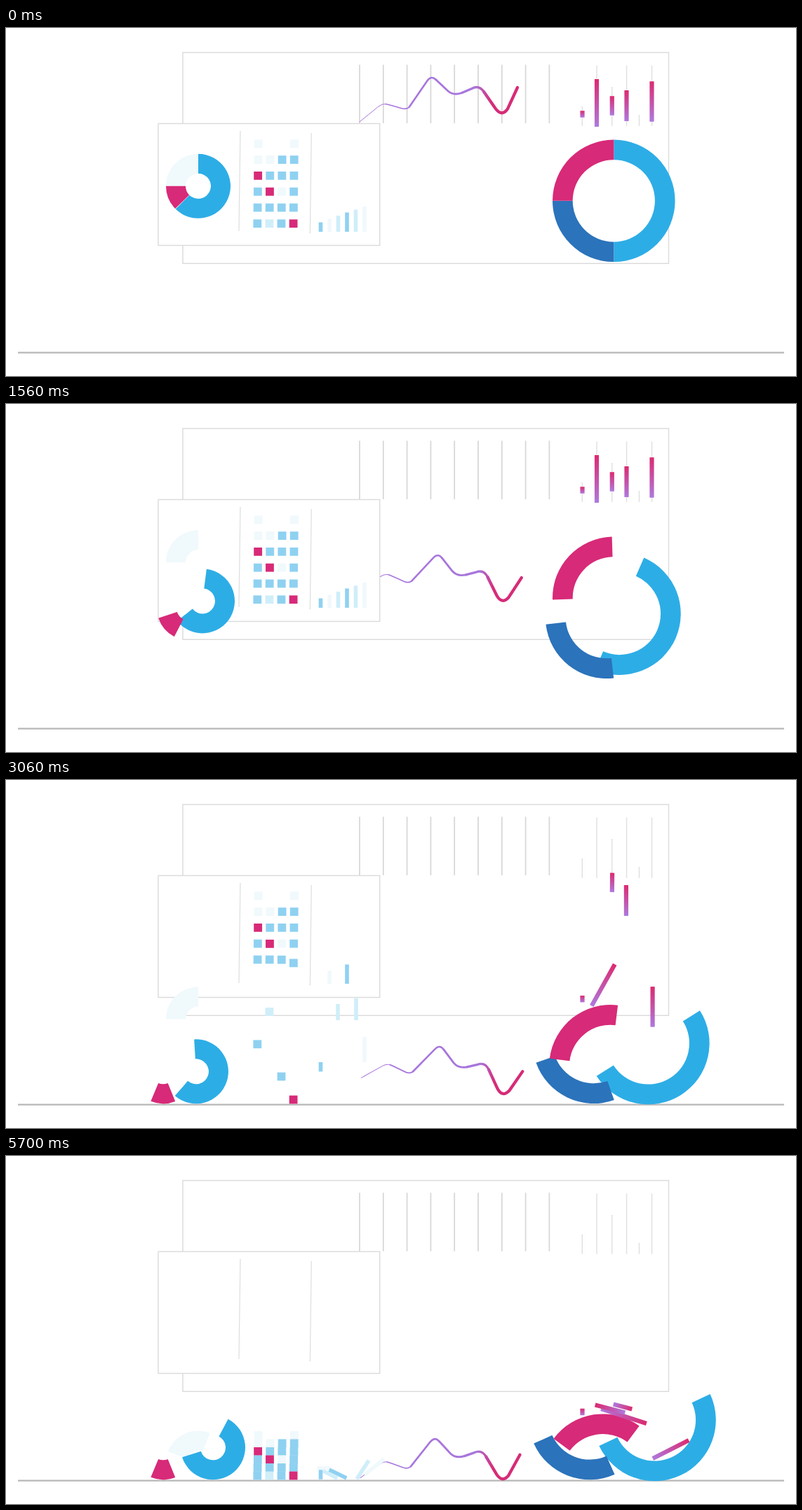
These frames come from a looping animation (1126 px wide and 497 px high, 5850 ms). An HTML page:

```html
<!DOCTYPE html>
<html lang="en">
<head>
<meta charset="utf-8">
<title>Falling charts</title>
<style>
  html, body { margin: 0; width: 100%; height: 100%; overflow: hidden; background: #fff; }
  svg { display: block; width: 100%; height: 100%; }
</style>
</head>
<body>
<svg id="stage" viewBox="0 0 1126 497">
  <defs>
    <linearGradient id="candle" x1="0" y1="0" x2="0" y2="1">
      <stop offset="0" stop-color="#dc2a70"/><stop offset="1" stop-color="#ae79de"/>
    </linearGradient>
    <linearGradient id="trend" gradientUnits="userSpaceOnUse" x1="668" y1="0" x2="692" y2="0">
      <stop offset="0" stop-color="#a876dc"/><stop offset="1" stop-color="#d62c78"/>
    </linearGradient>
  </defs>
</svg>
<script>
const LOOP = 5850, LAST = 5700, STEP = 30;
const BLUE = '#2dade6', DARK = '#2b73bb', PINK = '#d72a78';
const PALE = '#f0f9fc', LIGHT = '#cfeef9', MID = '#8fd1f1';
const stage = document.getElementById('stage');
const parts = [];
const mix = (a, b, u) => a + (b - a) * u;
const radians = deg => deg * Math.PI / 180;

function add(tag, attrs, parent = stage) {
  const el = document.createElementNS('http://www.w3.org/2000/svg', tag);
  for (const name in attrs) el.setAttribute(name, attrs[name]);
  return parent.appendChild(el);
}

function line(x1, y1, x2, y2, stroke, width) {
  add('line', { x1, y1, x2, y2, stroke, 'stroke-width': width });
}

function panel(x, y, width, height) {
  add('rect', { x, y, width, height, fill: '#fff', stroke: '#dadada', 'stroke-width': 1.4 });
}

function block(width, height, fill) {
  return add('rect', { x: -width / 2, y: -height / 2, width, height, fill });
}

// Ring sector around the origin; angles run clockwise from the top
function sector(outer, inner, from, to, fill) {
  const at = (r, deg) => `${r * Math.sin(radians(deg))} ${-r * Math.cos(radians(deg))}`;
  const large = to - from > 180 ? 1 : 0;
  const d = `M${at(outer, from)}A${outer} ${outer} 0 ${large} 1 ${at(outer, to)}` +
    `L${at(inner, to)}A${inner} ${inner} 0 ${large} 0 ${at(inner, from)}Z`;
  return add('path', { d, fill });
}

// A part falls from one pose [x, y, turn] to its landing pose, then settles into its rest pose.
// speed: px per second, ramp: ms to reach it, drift and tip: exponents of the sideways motion,
// turn: how early the rotation completes, sway: degrees rolled away and back on landing
function drop(el, start, speed, from, land, rest = land, options = {}) {
  parts.push({
    el, start, speed, from, land, rest,
    settle: 300, ramp: 150, drift: 1, turn: 1, tip: 1, sway: 0, radius: 0, ...options
  });
}

function pose(p, t) {
  const [x0, y0] = p.from, [x1, y1, r1 = 0] = p.land, [x2, y2, r2 = 0] = p.rest;
  const time = Math.max(0, t - p.start), height = y1 - y0, speed = p.speed / 1000;
  const fallen = time < p.ramp ? speed * time * time / (2 * p.ramp) : speed * (time - p.ramp / 2);
  if (fallen < height) {
    const f = fallen / height;
    return [mix(x0, x1, f ** p.drift), y0 + fallen, r1 * Math.min(1, f * p.turn)];
  }
  const u = Math.min(1, (fallen - height) / speed / p.settle), v = u ** p.tip;
  const roll = p.sway * Math.sin(Math.PI * u);
  return [mix(x1, x2, v) + radians(roll) * p.radius, mix(y1, y2, u), mix(r1, r2, v) + roll];
}

// Back panel, grid and wicks
panel(252, 35, 692.5, 301.3);
for (let i = 0; i < 9; i++) line(504 + i * 33.8, 52.5, 504 + i * 33.8, 136, '#d6d6d6', 1.7);
[[821.3, 112], [842, 53.5], [863.8, 84], [884.6, 53.5], [902.5, 124], [920.6, 53.5]]
  .forEach(([x, y]) => line(x, y, x, 140, '#dedede', 1.3));
line(17, 463.6, 1109, 463.6, '#b7b7b7', 2.2);

// Trend line, with its origin at the valley
const trend = add('g', {});
const curve = add('g', {
  transform: 'translate(-706.5 -121)', fill: 'none', stroke: 'url(#trend)', 'stroke-linecap': 'round'
}, trend);
[
  ['M504 134L531 112Q536 108 541 108.5', 1],
  ['M541 108.5Q546 109.5 563 114.5Q571 117 575 112.5', 1.7],
  ['M575 112.5L600 76Q606 67 613 74', 2.6],
  ['M613 74L630 90Q638 97 650 92.5', 2.9],
  ['M650 92.5L664 86.5Q674 81 681 91', 3.3],
  ['M681 91L698 115.5Q707 127 715 115.5L729 85', 4.3]
].forEach(([d, width]) => add('path', { d, 'stroke-width': width }, curve));
drop(trend, 0, 111.5, [706.5, 121], [708, 461, 10], [707.5, 461, 4], { ramp: 260, turn: 1.8, settle: 220 });

// Front panel
panel(217, 136.5, 315.7, 174);
line(334, 147, 332, 290, '#dedede', 1.2);
line(435.3, 150, 433.4, 293.5, '#dedede', 1.2);

// Large ring
const ring = [866.3, 246.8];
const arc = (from, to, fill) => sector(87.3, 58.6, from, to, fill);
drop(arc(0, 180, BLUE), 0, 51, ring, [915.3, 376, 57.5], [924.5, 377, 65], { ramp: 1050, drift: 2 });
drop(arc(180, 270, DARK), 0, 56, ring, [844, 374.5, -14.5], [832, 375, -24], { ramp: 1050, settle: 500 });
drop(arc(270, 360, PINK), 1060, 75, ring, [866.3, 350, -6], [850.7, 455.7, 36.5], { ramp: 200, settle: 950, tip: 2 });

// Small pie
const pie = [274, 225.8];
const slice = (from, to, fill) => sector(46, 18, from, to, fill);
drop(slice(270, 360, PALE), 1520, 79, pie, [274, 419], [274, 438.5, 21]);
drop(slice(0, 224.5, BLUE), 950, 104, pie, [294.6, 416.3, 25], [295, 416.3, 28], { settle: 500, sway: -31, radius: 46 });
drop(slice(225.5, 270, PINK), 1000, 135, pie, [236, 416.3, -53], [224, 416.3, -67.5], { settle: 200 });

// Squares stack up column by column: the bottom rows go in order of rank, the rest peel off upwards
const tints = { p: PALE, l: LIGHT, m: MID, k: PINK };
const ranks = [2, 3, 1, 0];
function release(row, rank) {
  if (row === 5) return 1625 + 330 * rank;
  if (row === 4) return 2985 + 60 * rank;
  return 4005 - row * (110 + 70 * rank);
}
['p  p', 'ppmm', 'kmmm', 'mkpm', 'mmmm', 'mlmk'].forEach((tiles, row) => [...tiles].forEach((key, col) => {
  if (key === ' ') return;
  const x = 359.7 + col * 17.1 - row * 0.28;
  drop(block(11.8, 11.8, tints[key]), release(row, ranks[col]), row === 5 ? 140 : 260,
    [x, 165.3 + row * 22.8], [x, 456.5 - (5 - row) * 11.55]);
}));

// Small bars share a baseline
function bar(index, height, fill, start, speed, land, rest, options) {
  drop(block(5.6, height, fill), start, speed, [448.5 + index * 12.5, 291 - height / 2], land, rest, options);
}
bar(5, 36, PALE, 1938, 107, [511, 430], [525, 444, 51]);
bar(4, 31.5, LIGHT, 2735, 208, [500, 440], [508.5, 448, 33], { settle: 340 });
bar(1, 18.5, PALE, 3572, 208, [455, 436], [452.5, 445.5, 90]);
bar(2, 23, LIGHT, 2735, 208, [472, 446], [462, 455, -62], { settle: 400 });
bar(3, 27.5, MID, 3079, 208, [484, 443], [473, 454, -64]);
bar(0, 13.5, MID, 2382, 208, [448.5, 455]);

// Candles
const candle = (height, ...fall) => drop(block(6.2, height, 'url(#candle)'), ...fall);
candle(9.5, 1580, 135, [821.5, 123], [821.5, 313], [821.5, 365.5], { settle: 440 });
candle(68, 1850, 161, [842, 107], [840.5, 264], [880.5, 371.5, 108], { settle: 595 });
candle(57.5, 2382, 363, [920.5, 105], [922, 407], [947.5, 419, 63], { settle: 210 });
candle(44, 2750, 260, [884.5, 111], [882.5, 320], [861, 361, -75.5], { settle: 250 });
candle(27.5, 2815, 208, [863.8, 111], [865, 345, 4], [879, 358, 105]);

function draw(t) {
  for (const part of parts) {
    const [x, y, r] = pose(part, t).map(n => n.toFixed(2));
    part.el.setAttribute('transform', `translate(${x} ${y}) rotate(${r})`);
  }
}

const begin = performance.now();
function tick() {
  const t = (performance.now() - begin) % LOOP;
  draw(Math.min(LAST, Math.floor(t / STEP) * STEP));
  requestAnimationFrame(tick);
}
draw(0);
requestAnimationFrame(tick);
</script>
</body>
</html>
```
